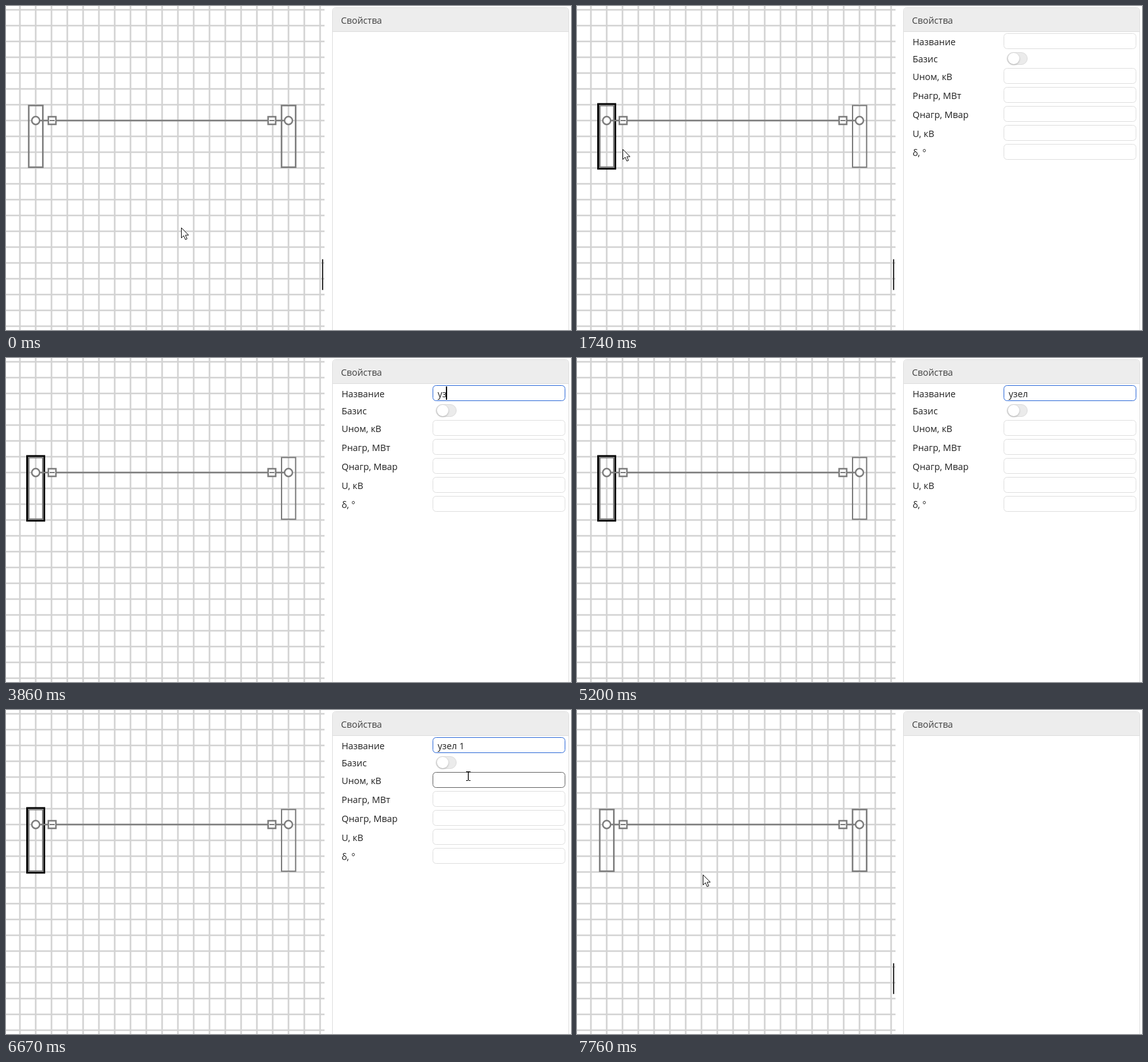
Write an HTML page with a canvas that moves like this. It is 894 by 512 pixels and loops after 8000 ms.

```html
<!DOCTYPE html>
<html lang="ru">
<head>
<meta charset="utf-8">
<title>Свойства</title>
<style>
  html, body { margin: 0; width: 100%; height: 100%; overflow: hidden; background: #fff; }
  canvas { display: block; }
</style>
</head>
<body>
<canvas id="stage" width="894" height="512"></canvas>
<script>
const ctx = document.getElementById('stage').getContext('2d');
const LOOP = 8000;
const FONT = '14.4px "Open Sans", "Noto Sans", sans-serif';
const GRAY = '#7d7d7d';

const LABELS = [
  ['Название', 62], ['Базис', 89], ['Uном, кВ', 117], ['Pнагр, МВт', 147],
  ['Qнагр, Мвар', 177], ['U, кВ', 207], ['δ, °', 237]
];
const FIELDS = [43, 98, 128, 158, 188, 218];

// Pointer moves: start, end, step count, from, to, sideways bend in y
const MOVES = [
  { a: 730, b: 1290, n: 19, from: [277, 350], to: [54, 231], bend: 16 },
  { a: 1680, b: 2270, n: 20, from: [54, 231], to: [712, 52], bend: 0 },
  { a: 6200, b: 6560, n: 8, from: [724, 63], to: [731, 104], bend: 0 },
  { a: 7010, b: 7460, n: 15, from: [731, 104], to: [199, 260], bend: -11 }
];
const KEYS = [[3500, 'у'], [3860, 'уз'], [4090, 'узе'], [4360, 'узел'], [4630, 'узел '], [5570, 'узел 1']];
const CARETS = [[2500, 3040], [3500, 5200], [5570, 6200]];

const clamp = v => Math.max(0, Math.min(1, v));
const smooth = u => u * u * (3 - 2 * u);
const between = (t, a, b) => t >= a && t < b;

function pointer(t) {
  let pos = MOVES[0].from;
  for (const m of MOVES) {
    if (t < m.a) break;
    const step = Math.floor((t - m.a) / (m.b - m.a) * (m.n - 1) + 1e-6) + 1;
    const s = smooth(clamp(step / m.n));
    pos = [
      m.from[0] + (m.to[0] - m.from[0]) * s,
      m.from[1] + (m.to[1] - m.from[1]) * s + m.bend * 4 * s * (1 - s)
    ];
  }
  return pos.map(Math.round);
}

function line(x1, y1, x2, y2, color, width) {
  ctx.strokeStyle = color;
  ctx.lineWidth = width;
  ctx.beginPath();
  ctx.moveTo(x1, y1);
  ctx.lineTo(x2, y2);
  ctx.stroke();
}

function box(x, y, w, h, r, fill, stroke, width = 1) {
  ctx.beginPath();
  ctx.roundRect(x, y, w, h, r);
  if (fill) { ctx.fillStyle = fill; ctx.fill(); }
  if (stroke) { ctx.strokeStyle = stroke; ctx.lineWidth = width; ctx.stroke(); }
}

function text(s, x, y, color) {
  ctx.font = FONT;
  ctx.fillStyle = color;
  ctx.fillText(s, x, y);
}

function drawGrid() {
  for (let x = 22; x < 504; x += 25) line(x, 0, x, 512, '#d3d3d3', 2.6);
  for (let y = 6; y < 512; y += 25) line(0, y, 504, y, '#d3d3d3', 2.6);
}

function drawTerminal(x, boxX) {
  box(boxX - 6, 175, 12, 12, 0, '#fff', GRAY, 2.4);
  line(boxX - 4, 181, boxX + 4, 181, GRAY, 2);
  ctx.beginPath();
  ctx.arc(x, 181, 6.2, 0, Math.PI * 2);
  ctx.fillStyle = '#fff';
  ctx.fill();
  ctx.strokeStyle = GRAY;
  ctx.lineWidth = 2.4;
  ctx.stroke();
}

function drawScheme(selected) {
  if (selected) box(33.5, 155, 27, 102, 0, null, '#000', 3);
  box(36, 157.2, 22.3, 97.5, 0, null, GRAY, 2.5);
  box(436, 157.2, 22.3, 97.5, 0, null, GRAY, selected ? 2 : 2.5);
  line(47, 181, 447, 181, GRAY, 2.6);
  drawTerminal(47, 73);
  drawTerminal(447, 420.7);
}

function drawHandle(t) {
  const alpha = t < 2030 ? 1 : t < 7000 ? 1 - clamp((t - 2030) / 200) : clamp((t - 7230) / 220);
  ctx.globalAlpha = alpha;
  box(500, 400, 2, 49, 1, '#333');
  ctx.globalAlpha = 1;
}

function drawPanel() {
  box(516.5, 2.5, 374, 530, 5, '#fff', '#dedede');
  box(517, 3, 373, 37, [4, 4, 0, 0], '#ededed');
  line(517, 40.5, 890, 40.5, '#dedede', 1);
  text('Свойства', 530, 28, '#404040');
}

function drawToggle() {
  box(680.5, 73.5, 32, 19, 9.5, '#ebebeb', '#dcdcdc');
  ctx.save();
  ctx.shadowColor = 'rgba(0,0,0,.25)';
  ctx.shadowBlur = 3;
  ctx.shadowOffsetY = 1;
  box(682, 74, 18, 18, 9, '#fff');
  ctx.restore();
}

function drawForm(t, mouse) {
  const focus = between(t, 2500, 6680) ? 0 : t >= 6680 ? 1 : -1;
  for (const [s, y] of LABELS) text(s, 531, y, '#222');
  FIELDS.forEach((y, i) => {
    const hover = inField(mouse, y) && (mouseShown(t));
    const edge = i === focus ? '#2f6bd8' : hover ? '#666' : '#dfdfdf';
    box(675.5, y + .5, 209, 24, 5, '#fff', edge);
  });
  drawToggle();

  const typed = KEYS.reduce((last, [at, s]) => t >= at ? s : last, '');
  text(typed, 683, 62, '#222');
  ctx.fillStyle = '#000';
  if (CARETS.some(([a, b]) => between(t, a, b))) {
    ctx.fillRect(Math.round(682 + ctx.measureText(typed).width), 45, 2, 21);
  }
  if (between(t, 6680, 7210)) ctx.fillRect(682, 100, 2, 21);
}

const mouseShown = t => !between(t, 3500, 6200);
const inField = ([x, y], top) => x >= 675 && x < 885 && y >= top && y < top + 25;

function drawArrow(x, y) {
  const pts = [[0, 0], [0, 16], [3.7, 12.5], [6.4, 18.6], [9, 17.5], [6.4, 11.6], [11.4, 11.6]];
  ctx.beginPath();
  pts.forEach(([dx, dy]) => ctx.lineTo(x + .5 + dx, y + .5 + dy));
  ctx.closePath();
  ctx.fillStyle = '#fff';
  ctx.fill();
  ctx.strokeStyle = '#111';
  ctx.lineWidth = 1;
  ctx.stroke();
}

function drawBeam(x, y) {
  line(x + .5, y - 7, x + .5, y + 7, '#000', 1.3);
  for (const dy of [-7, 7]) {
    line(x - 3, y + dy + .5, x, y + dy + .5, '#000', 1);
    line(x + 1, y + dy + .5, x + 4, y + dy + .5, '#000', 1);
  }
}

function draw(t) {
  const mouse = pointer(t);
  const selected = between(t, 1450, 7720);
  const form = t < 7760 ? clamp((t - 1420) / 90) : 0;
  ctx.clearRect(0, 0, 894, 512);
  drawGrid();
  drawScheme(selected);
  drawHandle(t);
  drawPanel();
  if (t >= 1450 && form) {
    ctx.globalAlpha = form;
    drawForm(t, mouse);
    ctx.globalAlpha = 1;
  }
  if (mouseShown(t)) {
    const overText = t >= 1510 && FIELDS.some(y => inField(mouse, y));
    (overText ? drawBeam : drawArrow)(...mouse);
  }
}

function tick() {
  draw(performance.now() % LOOP);
  requestAnimationFrame(tick);
}
tick();
</script>
</body>
</html>
```
